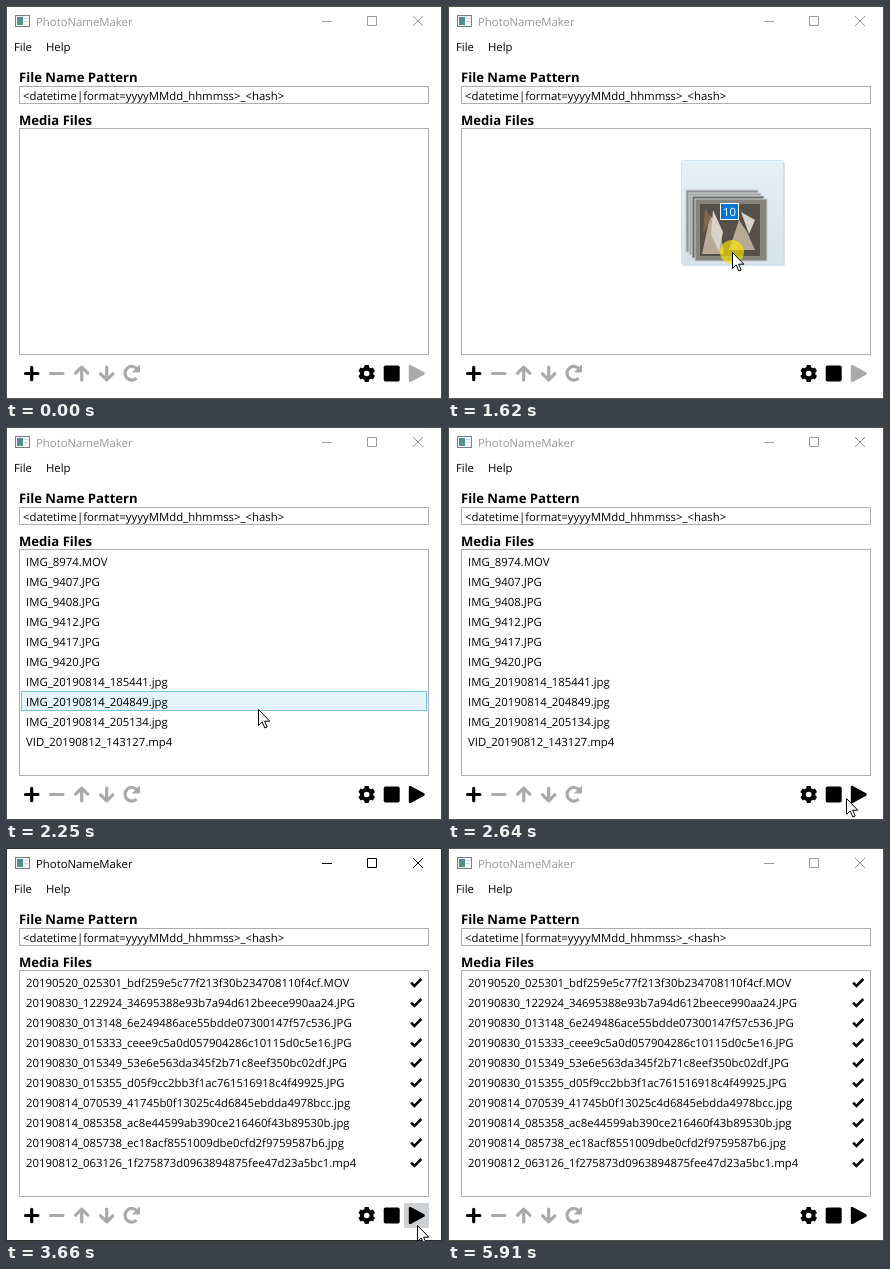
An HTML page that plays this animation: 436 px wide and 393 px high, repeating every 5.99 s.

```html
<!DOCTYPE html>
<html lang="en">
<head>
<meta charset="utf-8">
<title>PhotoNameMaker</title>
<style>
  html, body { margin: 0; width: 100%; height: 100%; overflow: hidden; background: #fff; }
  svg { display: block; width: 100vw; height: 100vh; }
  text { font: 11.35px "Open Sans", "Noto Sans", sans-serif; white-space: pre; text-rendering: geometricPrecision; }
  .head { font-size: 13.1px; font-weight: 700; }
  .box { fill: #fff; stroke: #abadb3; }
  .line { fill: none; stroke-width: 3.2; stroke-linecap: round; stroke-linejoin: round; }
  .off { stroke: #a9a9a9; }
  .on { stroke: #000; }
</style>
</head>
<body>
<svg viewBox="0 0 436 393">
  <defs>
    <linearGradient id="pane" x2="0" y2="1">
      <stop stop-color="#4f86a0"/><stop offset="1" stop-color="#4f9a78"/>
    </linearGradient>
    <linearGradient id="ghost" x2="0" y2="1">
      <stop stop-color="#e6f5fb"/><stop offset="1" stop-color="#d5e3ec"/>
    </linearGradient>
  </defs>
  <rect width="436" height="393" fill="#fff"/>

  <!-- title bar -->
  <rect x="9.5" y="9.5" width="14" height="11" fill="#f4f6f7" stroke="#777f86"/>
  <rect x="11" y="11" width="6" height="8" fill="url(#pane)"/>
  <path d="M18 12.5h4M18 15.5h4" stroke="#d0d5d8"/>
  <text id="title" x="30" y="20">PhotoNameMaker</text>
  <path id="controls" d="M316 15.5h10M361.5 10.5h9v9h-9zM407 10l10 10M417 10l-10 10" fill="none"/>
  <text x="8" y="45">File</text>
  <text x="40" y="45">Help</text>

  <!-- form -->
  <text class="head" x="13" y="76">File Name Pattern</text>
  <rect class="box" x="13.5" y="80.5" width="409" height="17"/>
  <text x="17" y="94">&lt;datetime|format=yyyyMMdd_hhmmss&gt;_&lt;hash&gt;</text>
  <text class="head" x="13" y="119">Media Files</text>
  <rect class="box" x="13.5" y="122.5" width="409" height="226"/>
  <rect id="hover" x="15.5" width="405" height="19" fill="#e5f3fb" stroke="#70c0e7"/>
  <g id="rows"></g>

  <!-- toolbar: 25 px buttons -->
  <g class="line">
    <path class="on" d="M19.5 367.5h12.4M25.7 361.3v12.4"/>
    <path class="off" d="M44.5 367.5h12.4"/>
    <path class="off" d="M75.7 374v-12.5M69.6 367.2l6.1-6.1 6.1 6.1"/>
    <path class="off" d="M100.7 361v12.5M94.6 367.8l6.1 6.1 6.1-6.1"/>
    <path class="off" stroke-linecap="butt" d="M131.1 363A6.8 6.8 0 1 0 130.6 372.1"/>
  </g>
  <path d="M133.5 359.2v6.8h-6.8z" fill="#a9a9a9" stroke="#a9a9a9" stroke-linejoin="round"/>
  <g id="gear" transform="translate(360.7 367.5)">
    <circle r="4.8" fill="none" stroke="#000" stroke-width="4"/>
  </g>
  <rect x="377.7" y="359.5" width="16" height="16" rx="1.8"/>
  <rect id="button" x="398" y="355" width="25" height="25"/>
  <path id="play" d="M404.1 360.2v14.6l13.4-7.3z" stroke-width="2.6" stroke-linejoin="round"/>

  <rect id="frame" x=".5" y=".5" width="435" height="392" fill="none"/>

  <!-- pointer, with its origin at the tip -->
  <g id="pointer">
    <g id="drag" transform="translate(-51 -92)">
      <rect x="1" y="2" width="103" height="104" rx="2" fill="#000" opacity=".12"/>
      <rect x=".5" y=".5" width="102" height="104" rx="2" fill="url(#ghost)" stroke="#c3e3f1" opacity=".8"/>
      <g id="stack"></g>
      <rect x="19" y="44" width="60" height="52" fill="#56504a"/>
      <path d="M21 94l8-38 9 8 5 30zM48 90l10-30 8 12 8 18z" fill="#b9aa98"/>
      <path d="M32 50l10 22-4 20-8-18zM60 52l14 8-6 14z" fill="#d8d2c8"/>
      <path d="M24 48l6 10-8 16z" fill="#80664f"/>
      <rect x="39.5" y="43.5" width="18" height="16" fill="#0078d7" stroke="#fff"/>
      <text x="42" y="56" fill="#fff">10</text>
    </g>
    <circle id="press" r="12" fill="#ffe600" opacity=".65"/>
    <path d="M.5.5v16l3.7-3.5 2.7 6 2.3-1-2.6-5.8h5.2z" fill="#fff" stroke="#000"/>
  </g>
</svg>
<script>
const LOOP = 5990;
const BEFORE = [
  'IMG_8974.MOV', 'IMG_9407.JPG', 'IMG_9408.JPG', 'IMG_9412.JPG', 'IMG_9417.JPG', 'IMG_9420.JPG',
  'IMG_20190814_185441.jpg', 'IMG_20190814_204849.jpg', 'IMG_20190814_205134.jpg',
  'VID_20190812_143127.mp4'
];
const AFTER = [
  '20190520_025301_bdf259e5c77f213f30b234708110f4cf.MOV',
  '20190830_122924_34695388e93b7a94d612beece990aa24.JPG',
  '20190830_013148_6e249486ace55bdde07300147f57c536.JPG',
  '20190830_015333_ceee9c5a0d057904286c10115d0c5e16.JPG',
  '20190830_015349_53e6e563da345f2b71c8eef350bc02df.JPG',
  '20190830_015355_d05f9cc2bb3f1ac761516918c4f49925.JPG',
  '20190814_070539_41745b0f13025c4d6845ebdda4978bcc.jpg',
  '20190814_085358_ac8e44599ab390ce216460f43b89530b.jpg',
  '20190814_085738_ec18acf8551009dbe0cfd2f9759587b6.jpg',
  '20190812_063126_1f275873d0963894875fee47d23a5bc1.mp4'
];

// time, pointer x, pointer y
const POINTER = [
  [0, -99, -99],
  [1390, 443, 304], [1470, 394, 288], [1540, 342, 268], [1620, 284, 246], [1700, 234, 227],
  [1770, 195, 212], [1850, 169, 202],
  [2170, 212, 246], [2250, 252, 282], [2320, 290, 311], [2400, 325, 335], [2480, 355, 352],
  [2560, 380, 364], [2640, 398, 371], [2720, 409, 375], [2790, 411, 377],
  [4750, 411, 386], [4820, -99, -99]
];
// time, number of renamed files
const RENAMED = [[0, 0], [3430, 4], [3510, 6], [3580, 8], [3660, 10]];
const DROP = 1770;

const $ = id => document.getElementById(id);
const between = (t, from, to) => t >= from && t < to;
const stepAt = (steps, t) => steps.findLast(step => step[0] <= t);
const show = (el, on) => el.setAttribute('visibility', on ? 'visible' : 'hidden');

function add(parent, name, attrs) {
  const el = document.createElementNS('http://www.w3.org/2000/svg', name);
  for (const key in attrs) el.setAttribute(key, attrs[key]);
  return parent.appendChild(el);
}

const rows = BEFORE.map((_, i) => ({
  name: add($('rows'), 'text', { x: 20, y: 139 + 20 * i }),
  check: add($('rows'), 'path', {
    d: `M405.1 ${134.6 + 20 * i}l3.3 3.3 6.9-6.9`, fill: 'none', stroke: '#000', 'stroke-width': 2.5
  })
}));

for (let i = 0; i < 6; i++) {
  add($('gear'), 'rect', { x: -2.3, y: -8.4, width: 4.6, height: 4, rx: 0.8, transform: `rotate(${60 * i})` });
}
['#8d9296', '#a6aaa6', '#6b6d68', '#85857c'].forEach((fill, i) =>
  add($('stack'), 'rect', { x: 5 + 3 * i, y: 30 + 3 * i, width: 72, height: 62, fill, stroke: '#c9cdd0' }));

function render(t) {
  const [, x, y] = stepAt(POINTER, t);
  const renamed = stepAt(RENAMED, t)[1];
  const dropped = t >= DROP;
  const active = between(t, 2960, 5910);
  const dragging = between(t, 1390, DROP);
  const pressed = between(t, 2960, 3110);

  $('title').setAttribute('fill', active ? '#000' : '#999');
  $('controls').setAttribute('stroke', active ? '#000' : '#999');
  $('frame').setAttribute('stroke', active ? '#2d2e2b' : '#55564f');

  rows.forEach(({ name, check }, i) => {
    const label = !dropped ? '' : i < renamed ? AFTER[i] : BEFORE[i];
    if (name.textContent !== label) name.textContent = label;
    show(check, i < renamed);
  });

  const row = Math.floor((y - 124) / 20);
  show($('hover'), dropped && x < 421 && row >= 0 && row < rows.length);
  $('hover').setAttribute('y', 124.5 + 20 * row);

  $('play').setAttribute('fill', dropped ? '#000' : '#a9a9a9');
  $('play').setAttribute('stroke', dropped ? '#000' : '#a9a9a9');
  show($('button'), between(t, 2790, 4750));
  $('button').setAttribute('fill', pressed ? '#b4b8bc' : '#cdd1d4');

  $('pointer').setAttribute('transform', `translate(${x} ${y})`);
  show($('drag'), dragging);
  show($('press'), dragging || pressed);
}

const start = performance.now();
function tick() {
  render((performance.now() - start) % LOOP);
  requestAnimationFrame(tick);
}
tick();
</script>
</body>
</html>
```
